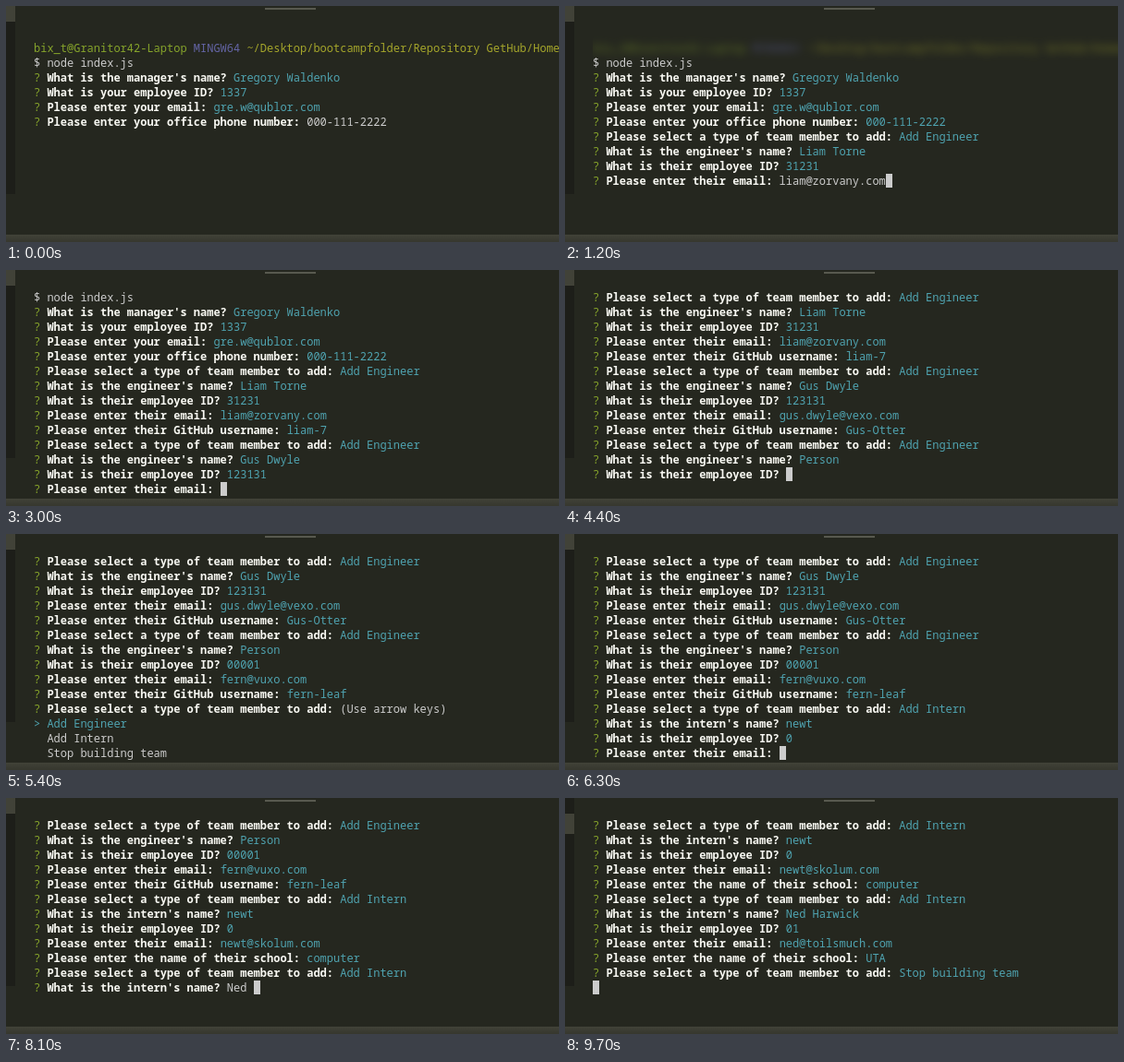
These frames come from a looping animation (598 by 256 pixels, 9800 ms). An HTML page:

```html
<!DOCTYPE html>
<html lang="en">
<head>
<meta charset="utf-8">
<title>Team builder prompt</title>
<style>
  html, body { margin: 0; width: 100%; height: 100%; overflow: hidden; background: #25271f; }
  div, pre { position: absolute; margin: 0; }
  #side { left: 0; top: 0; width: 10px; height: 204px; background: #1d1e19; }
  #mark { left: 0; top: 0; width: 10px; height: 17px; background: #414238; }
  #grip { left: 280px; top: 2px; width: 55px; height: 2px; background: #58594f; }
  #bar { left: 0; top: 248px; width: 100%; height: 8px; background: linear-gradient(#414238, #36372e); }
  #term {
    left: 30px; top: 22px; right: 0; height: 224px; overflow: hidden;
    font: 12px/16px "Noto Sans Mono", monospace; color: #ccc;
  }
  b { color: #f8f8f2; }
  .green { color: #86a42b; }
  .olive { color: #a5a62b; }
  .violet { color: #6465a6; }
  .cyan { color: #4fa3b0; }
  .smear { display: inline-block; height: 16px; vertical-align: top; filter: blur(5px); opacity: .6; }
  .cursor { display: inline-block; width: 7.2px; height: 15px; vertical-align: top; background: #ccc; }
</style>
</head>
<body>
<div id="side"></div>
<div id="mark"></div>
<div id="grip"></div>
<div id="bar"></div>
<pre id="term"></pre>
<script>
const LOOP = 9800, STEP = 100, ROWS = 14, DONE = 9600;
const CHOICES = ["Add Engineer", "Add Intern", "Stop building team"];
const SELECT = "Please select a type of team member to add:";
const ENGINEER = "What is the engineer's name?";
const INTERN = "What is the intern's name?";
const ID = "What is their employee ID?";
const EMAIL = "Please enter their email:";
const GITHUB = "Please enter their GitHub username:";
const SCHOOL = "Please enter the name of their school:";

// question, answer, time at which it is confirmed
const prompts = [
  ["What is the manager's name?", "Gregory Waldenko", -300],
  ["What is your employee ID?", "1337", -200],
  ["Please enter your email:", "gre.w@qublor.com", -150],
  ["Please enter your office phone number:", "000-111-2222", 100],
  [SELECT, CHOICES[0], 400],
  [ENGINEER, "Liam Torne", 600],
  [ID, "31231", 900],
  [EMAIL, "liam@zorvany.com", 1300],
  [GITHUB, "liam-7", 1700],
  [SELECT, CHOICES[0], 2000],
  [ENGINEER, "Gus Dwyle", 2500],
  [ID, "123131", 3000],
  [EMAIL, "gus.dwyle@vexo.com", 3500],
  [GITHUB, "Gus-Otter", 3800],
  [SELECT, CHOICES[0], 4100],
  [ENGINEER, "Person", 4400],
  [ID, "00001", 4700],
  [EMAIL, "fern@vuxo.com", 5100],
  [GITHUB, "fern-leaf", 5400],
  [SELECT, CHOICES[1], 5700],
  [INTERN, "newt", 6000],
  [ID, "0", 6300],
  [EMAIL, "newt@skolum.com", 6700],
  [SCHOOL, "computer", 7000],
  [SELECT, CHOICES[1], 7900],
  [INTERN, "Ned Harwick", 8500],
  [ID, "01", 8700],
  [EMAIL, "ned@toilsmuch.com", 9000],
  [SCHOOL, "UTA", 9200],
  [SELECT, CHOICES[2], DONE],
];

const term = document.getElementById("term");
const mark = document.getElementById("mark");
const span = (cls, text = "") => `<span class="${cls}">${text}</span>`;
const path = span("green", "bix_t@Granitor42-Laptop") + " " + span("violet", "MINGW64") + " " +
  span("olive", "~/Desktop/bootcampfolder/Repository GetHub/Homework");

function screen(t) {
  const lines = ["", t < 400 ? path : span("smear", path), "$ node index.js"];
  const cursor = t < STEP ? "" : span("cursor");
  let start = -500, deepest = 0;
  for (const [question, answer, end] of prompts) {
    if (t < start) break;
    const isList = question === SELECT;
    const head = span("green", "?") + ` <b>${question}</b> `;
    // the terminal never scrolls back after a list has been open
    deepest = Math.max(deepest, lines.length + (isList ? CHOICES.length : 0));
    if (t >= end) {
      lines.push(head + span("cyan", answer));
    } else if (isList) {
      const picked = Math.floor((t - start) / (end - start) * (CHOICES.indexOf(answer) + 1));
      lines.push(head + (picked ? "" : "(Use arrow keys)"));
      CHOICES.forEach((c, i) => lines.push(i === picked ? span("cyan", "&gt; " + c) : "  " + c));
    } else {
      const typed = Math.min(1, (t - start) / (end - STEP - start));
      lines.push(head + answer.slice(0, Math.round(answer.length * typed)) + cursor);
    }
    start = end;
  }
  if (t >= DONE) lines.push(cursor);
  const top = Math.max(0, deepest + 1 - ROWS);
  return lines.slice(top, top + ROWS).join("\n");
}

let shown = -1;
function draw() {
  const t = Math.floor(performance.now() % LOOP / STEP) * STEP;
  if (t !== shown) {
    shown = t;
    term.innerHTML = screen(t);
    mark.style.top = t < DONE ? "0" : "17px";
    mark.style.height = t < DONE ? "17px" : "22px";
  }
  requestAnimationFrame(draw);
}
draw();
</script>
</body>
</html>
```
